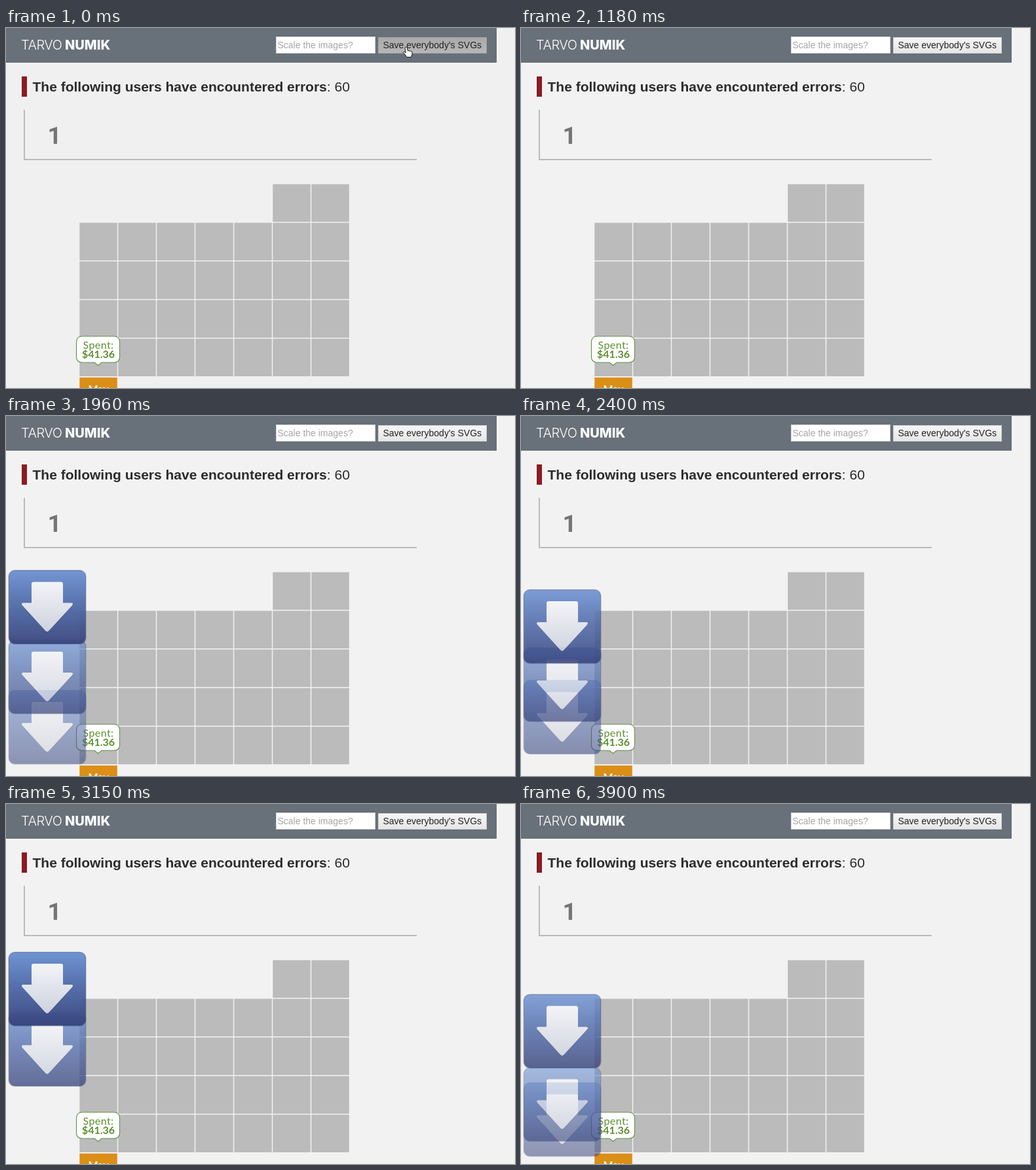
Animation of 777x550 px, one loop 4 s. Source, as an HTML page:

```html
<!DOCTYPE html>
<html lang="en">
<head>
<meta charset="utf-8">
<title>Saving charts</title>
<style>
  html, body { margin: 0; width: 100%; height: 100%; overflow: hidden; background: #f0f0f0; }
  svg { display: block; width: 777px; height: 550px; }
  .ui { font-family: "Liberation Sans", Arial, sans-serif; }
  .logo { font: 300 20px Inter, sans-serif; fill: #fff; }
  .lato { font-family: Lato, sans-serif; font-size: 16px; }
  .bold { font-weight: 700; }
</style>
</head>
<body>
<svg id="stage" viewBox="0 0 777 550" xmlns="http://www.w3.org/2000/svg">
  <defs>
    <linearGradient id="blue" x2="0" y2="1">
      <stop offset="0" stop-color="#698fd1"/>
      <stop offset=".45" stop-color="#4d69a9"/>
      <stop offset="1" stop-color="#35417a"/>
    </linearGradient>
    <linearGradient id="silver" x2="0" y2="1">
      <stop offset="0" stop-color="#f4f5f9"/>
      <stop offset="1" stop-color="#cbd0dc"/>
    </linearGradient>
    <linearGradient id="lit" x2="0" y2="1">
      <stop offset="0" stop-color="#f6f6f6"/>
      <stop offset="1" stop-color="#e6e6e6"/>
    </linearGradient>
    <linearGradient id="down" x2="0" y2="1">
      <stop offset="0" stop-color="#a9a9a9"/>
      <stop offset="1" stop-color="#b7b7b7"/>
    </linearGradient>
    <g id="drop">
      <rect x="3.2" y="-.4" width="119.6" height="114" rx="10" fill="#223" opacity=".2"/>
      <rect x="4.5" y=".5" width="117" height="112" rx="9" fill="url(#blue)" stroke="#34467f" stroke-opacity=".55"/>
      <path id="arrow" transform="translate(0 1.2)" fill="#23305f" opacity=".3"
        d="M42 18H84q3 0 3 3V50H100q3.500 .5 1 4L66 92q-3.200 4-6.400 0L25 54q-2.500-3.500 1-4H39V21q0-3 3-3z"/>
      <path fill="url(#silver)"
        d="M42 18H84q3 0 3 3V50H100q3.500 .5 1 4L66 92q-3.200 4-6.400 0L25 54q-2.500-3.500 1-4H39V21q0-3 3-3z"/>
    </g>
  </defs>

  <rect id="page" width="777" height="550"/>
  <rect width="749" height="53" fill="#68707a"/>
  <text class="logo" x="23" y="33" letter-spacing="-.5">TARVO</text>
  <text class="logo" x="90" y="33" style="font-weight:800">NUMIK</text>

  <g class="ui" font-size="14">
    <rect x="412.5" y="13.500" width="151" height="25" fill="#fff" stroke="#d2d4d6"/>
    <text x="414.500" y="31" fill="#a6a6a6">Scale the images?</text>
    <rect id="button" x="568.5" y="14.500" width="165" height="24"/>
    <text x="575.500" y="31" fill="#222">Save everybody's SVGs</text>
  </g>

  <rect x="24" y="74" width="8" height="31" fill="#8a1c23"/>
  <text class="ui" x="40.500" y="97" font-size="21" fill="#2b2b2d"><tspan class="bold">The following users have encountered errors</tspan>: 60</text>

  <path d="M28 125V201H627" fill="none" stroke="#bababa" stroke-width="2"/>
  <text class="bold" x="63.500" y="176.500" font-size="37" fill="#757575" font-family="Roboto, sans-serif">1</text>

  <g id="cells" fill="#bbb"></g>

  <rect x="112.300" y="534" width="57.500" height="16" fill="#db8f17"/>
  <text class="lato bold" x="141" y="556.500" text-anchor="middle" fill="#fff">May</text>
  <path d="M116.500 471H164.500q9 0 9 9V502q0 9-9 9H146L140.500 515.500 135 511H116.500q-9 0-9-9V480q0-9 9-9z" fill="#fff" stroke="#62904a" stroke-width="1.100"/>
  <g class="lato" text-anchor="middle" fill="#5b8e2d">
    <text x="141" y="490" letter-spacing=".4">Spent:</text>
    <text class="bold" x="141" y="504">$41.36</text>
  </g>

  <g id="drops"></g>

  <path id="hand" transform="translate(605 28)" fill="#fff" stroke="#111" stroke-linejoin="round"
    d="M4 2q1.500-2 3 0L8.500 7q1.500-1.200 2.500 .3 1.500-1 2.300 .5 1.700-.3 1.700 1.700V12L13.500 16.500H6.500L4.500 13 1 9.500q.5-2 2.500-.8L5.200 10z"/>
  <path id="pointer" fill="#111" stroke="#fff" stroke-linejoin="round"
    d="M0 0V15L3.500 12 6 17.500 8.500 16.300 6 11H11z"/>
</svg>
<script>
const LOOP = 4000, STEP = 150;
const TOP = 200, SPEED = 0.592, LIFE = 397;
const RELEASE = 1040;
// moments at which a download badge starts to fall
const launches = [1117, 1276, 1590, 1720, 1900, 2056, 2140, 2290,
                  2457, 2656, 2950, 3106, 3396, 3519, 3558, 3747];

const $ = id => document.getElementById(id);
const add = (parent, tag, attrs) => {
  const el = document.createElementNS("http://www.w3.org/2000/svg", tag);
  set(el, attrs);
  return parent.appendChild(el);
};
function set(el, attrs) {
  for (const key in attrs) el.setAttribute(key, attrs[key]);
}
const show = (el, on) => set(el, { visibility: on ? "visible" : "hidden" });

for (let row = 0; row < 5; row++) {
  for (let col = row ? 0 : 5; col < 7; col++) {
    add($("cells"), "rect", { x: 112.3 + 59 * col, y: 238.6 + 59 * row, width: 57.5, height: 57.5 });
  }
}

const drops = launches.map(start => ({ start, el: add($("drops"), "use", { href: "#drop" }) }));

const range = (from, to) => Array.from({ length: (to - from) / STEP + 1 }, (_, i) => from + i * STEP);
const ticks = [0, ...range(140, 740), RELEASE, ...range(1210, 1960), ...range(2100, 3900)];

function drawCursor(t) {
  show($("hand"), t < 140);
  show($("pointer"), t >= 140 && t < 740);
  const p = (t - 90) / 500;
  set($("pointer"), { transform: `translate(${613 + 79 * p} ${32 + 480 * p})` });
}

function drawDrop({ start, el }, t) {
  const age = t - start, live = age >= 0 && age <= LIFE;
  show(el, live);
  if (live) set(el, { y: TOP + SPEED * age, opacity: 1 - 0.5 * age / LIFE });
}

function draw(time) {
  const t = ticks.findLast(tick => tick <= time);
  const pressed = t < RELEASE;
  set($("page"), { fill: pressed ? "#f0f0f0" : "#f2f2f2" });
  set($("button"), { fill: pressed ? "url(#down)" : "url(#lit)", stroke: pressed ? "#a3a3a3" : "#d0d0d0" });
  drawCursor(t);
  drops.forEach(drop => drawDrop(drop, t));
}

const began = performance.now();
function loop() {
  draw((performance.now() - began) % LOOP);
  requestAnimationFrame(loop);
}
loop();
</script>
</body>
</html>
```
